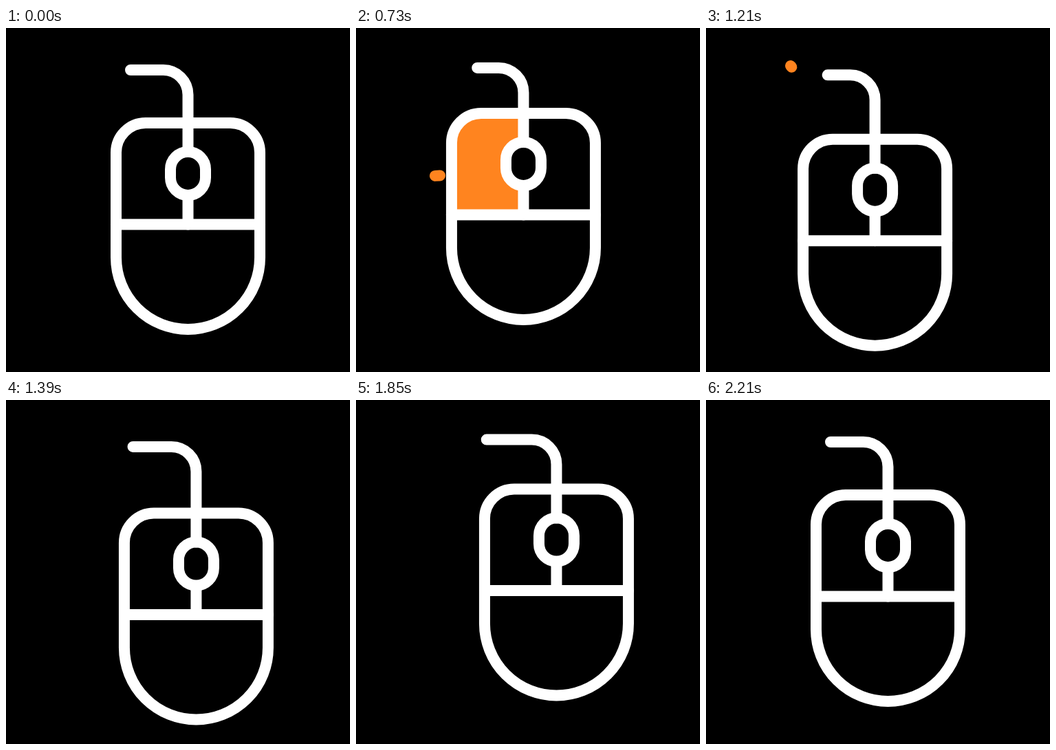
An HTML page with a canvas that plays this animation: 500x500 px, repeating every 3 s.

```html
<!DOCTYPE html>
<html lang="en">
<head>
<meta charset="utf-8">
<title>Mouse click</title>
<style>
  html, body { margin: 0; height: 100%; overflow: hidden; background: #000; }
  canvas { display: block; }
</style>
</head>
<body>
<canvas id="stage" width="500" height="500"></canvas>
<script>
const ctx = document.getElementById('stage').getContext('2d');
const LOOP = 3000, START = 490, END = 2210;
const FILL_ON = 670, FILL_OFF = 880;
const ORANGE = '#ff841f', CX = 264.5;

// The body runs along a heart-shaped loop: time, x, y
const PATH = [
  [START, 0, 0], [730, -21, -14], [970, -36.5, -11], [1210, -19, 23.5],
  [1315, -1, 35.5], [1550, 36.5, 0.5], [1680, 42.5, -8], [1850, 27, -8.5], [END, 0, 0]
];

// Rays fly outward one after another: from, to, start time
const RAYS = [
  { x: 122, y: 214.5, toX: 29, toY: 219.5, start: 715 },
  { x: 126, y: 166, toX: 63, toY: 121, start: 780 },
  { x: 168, y: 110, toX: 123, toY: 55, start: 905 }
];
const GROW = 210, SHRINK = 185, LIFE = 310;

const clamp = (v, lo, hi) => Math.min(hi, Math.max(lo, v));

function slope(i, axis) {
  const a = PATH[i - 1], b = PATH[i + 1];
  return a && b ? (b[axis] - a[axis]) / (b[0] - a[0]) : 0;
}

// Smooth curve through the path points
function offset(t) {
  t = clamp(t, START, END);
  const i = Math.max(0, PATH.findIndex(p => p[0] >= t) - 1);
  const a = PATH[i], b = PATH[i + 1], span = b[0] - a[0];
  const u = (t - a[0]) / span, v = 1 - u;
  return [1, 2].map(k =>
    a[k] * (1 + 2 * u) * v * v + b[k] * (1 + 2 * v) * u * u +
    span * u * v * (slope(i, k) * v - slope(i + 1, k) * u));
}

function line(x1, y1, x2, y2) {
  ctx.beginPath();
  ctx.moveTo(x1, y1);
  ctx.lineTo(x2, y2);
  ctx.stroke();
}

function drawBody(clicked) {
  const body = new Path2D(), wheel = new Path2D();
  body.roundRect(160, 138, 209, 300, [43, 43, 104.5, 104.5]);
  wheel.roundRect(239, 180, 51, 63, 25.5);
  if (clicked) {
    ctx.save();
    ctx.clip(body);
    ctx.fillStyle = ORANGE;
    ctx.fillRect(160, 138, CX - 160, 147);
    ctx.restore();
  }
  ctx.stroke(body);
  line(160, 285.5, 369, 285.5);
  line(CX, 243, CX, 285.5);
  ctx.fillStyle = '#000';
  ctx.fill(wheel);
  ctx.stroke(wheel);
}

// The free end of the cable follows the body only a little
function drawCable(dx, dy) {
  const x = CX + dx, bottom = 180 + dy;
  const endX = 181 + 0.27 * dx + 0.002 * dx * dx;
  const endY = 61 + 0.28 * dy - 0.04 * dx;
  ctx.beginPath();
  ctx.moveTo(endX, endY);
  ctx.arcTo(x, endY, x, bottom, 36);
  ctx.lineTo(x, bottom);
  ctx.stroke();
}

function drawRay({ x, y, toX, toY, start }, t) {
  const age = t - start;
  if (age < 0 || age >= LIFE) return;
  const head = clamp(age / GROW, 0, 1);
  const tail = clamp((age - SHRINK) / (LIFE - SHRINK), 0, 1);
  const w = toX - x, h = toY - y;
  line(x + w * tail, y + h * tail, x + w * head, y + h * head);
}

function frame() {
  const t = performance.now() % LOOP;
  const [dx, dy] = offset(t);
  ctx.fillStyle = '#000';
  ctx.fillRect(0, 0, 500, 500);
  ctx.lineWidth = 16;
  ctx.lineCap = 'round';

  ctx.strokeStyle = '#fff';
  ctx.save();
  ctx.translate(dx, dy);
  drawBody(t >= FILL_ON && t < FILL_OFF);
  ctx.restore();
  drawCable(dx, dy);

  ctx.strokeStyle = ORANGE;
  RAYS.forEach(ray => drawRay(ray, t));
  requestAnimationFrame(frame);
}
frame();
</script>
</body>
</html>
```
